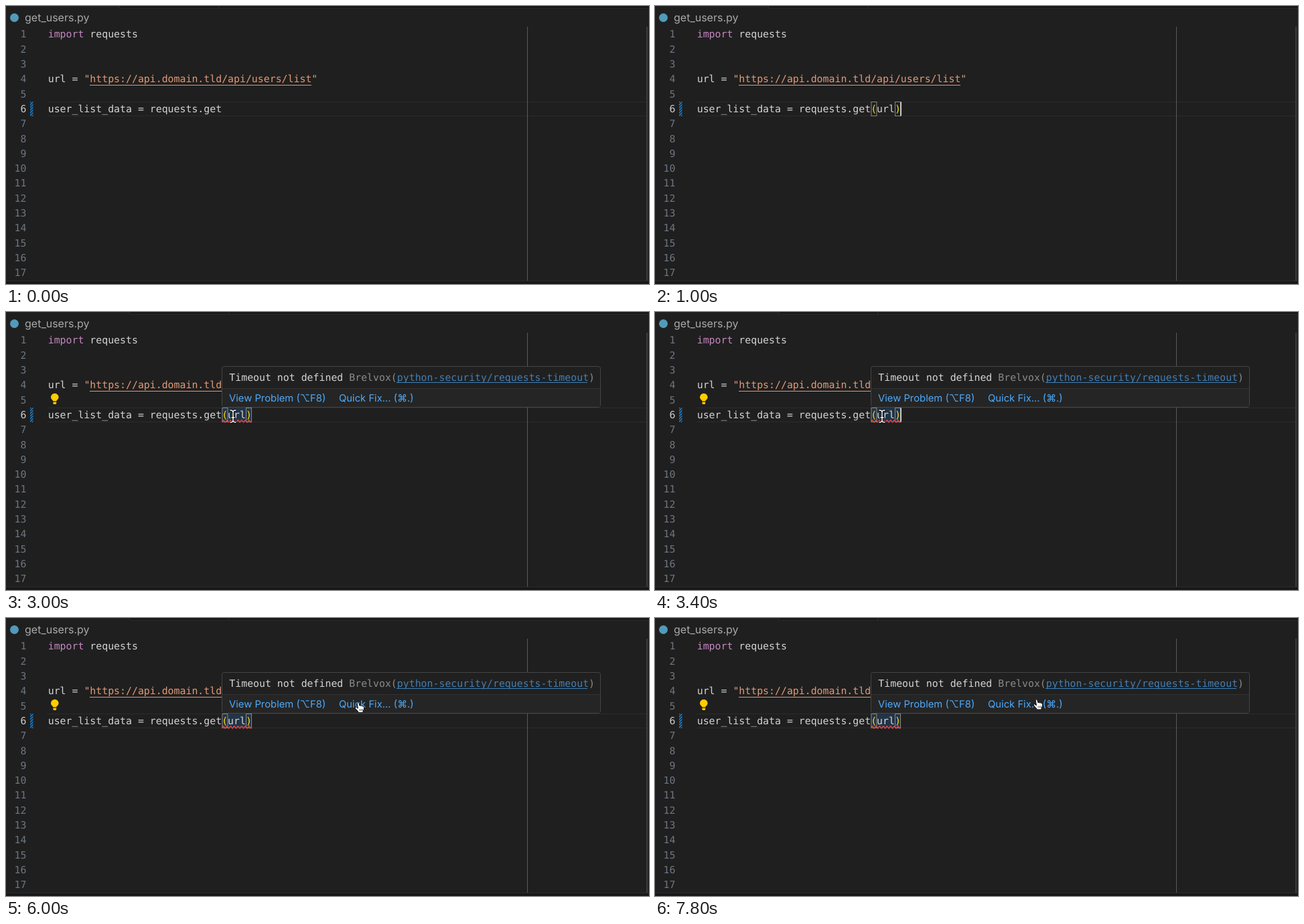
Animation, 960 px wide and 416 px high, one loop 8 s. Source, as an HTML page:

```html
<!DOCTYPE html>
<html lang="en">
<head>
<meta charset="utf-8">
<title>Code editor</title>
<style>
  html, body { margin: 0; width: 100%; height: 100%; overflow: hidden; background: #1f1f1f; }
  svg { display: block; width: 100vw; height: 100vh; }
  text { white-space: pre; text-rendering: geometricPrecision; fill: #d4d4d4; font: 14.86px "DejaVu Sans Mono", monospace; }
  .ui { font: 14.8px Inter, "DejaVu Sans", sans-serif; fill: #4daafc; }
  .crumb { font-size: 16px; fill: #a9a9a9; }
  .kind { font-size: 10.5px; fill: #d4d4d4; }
  .number { text-anchor: end; fill: #6e7681; }
  .active { fill: #cccccc; }
  .keyword { fill: #c586c0; }
  .string { fill: #e09a78; }
  .bracket { fill: #ffd700; }
  .match { fill: #2aaaff; font-weight: bold; }
  .dim { fill: #8b8b8b; }
  .link { fill: #407fb5; }
  .box { fill: #202020; stroke: #454545; }
  .pair rect { fill: none; stroke: #888; }
  .pointer { fill: #fff; stroke: #111; stroke-width: 1; stroke-linejoin: round; }
</style>
</head>
<body>
<svg viewBox="0 0 960 416" preserveAspectRatio="none">
  <defs>
    <pattern id="hatch" width="4" height="4" patternUnits="userSpaceOnUse">
      <path d="M-1 1L1 -1M0 4L4 0M3 5L5 3" stroke="#1687e0" stroke-width="1.5"/>
    </pattern>
  </defs>

  <rect width="960" height="416" fill="#1f1f1f"/>
  <g id="tabs">
    <rect width="960" height="3" fill="#181818"/>
    <path d="M0 3.5H960M.5 0V3M148.5 0V3" stroke="#2b2b2b"/>
  </g>
  <circle cx="12.5" cy="17.5" r="6.5" fill="#519aba"/>
  <text class="ui crumb" x="28" y="23.3">get_users.py</text>

  <path d="M62 143.5H956M62 164.5H956" stroke="#2b2b2b"/>
  <path d="M778.5 31V412" stroke="#5a5a5a"/>
  <path d="M957 31V412" stroke="#484848" stroke-width="1.5"/>
  <rect y="412" width="960" height="4" fill="#181818"/>
  <path d="M0 411.5H960" stroke="#2b2b2b"/>
  <rect x="36" y="143" width="4.5" height="22" fill="url(#hatch)"/>
  <g id="numbers"></g>

  <rect id="range" x="322.5" y="143.5" width="44.5" height="21" fill="#264f78" opacity=".45"/>
  <text x="62.7" y="47.4"><tspan class="keyword">import</tspan> requests</text>
  <text x="62.7" y="114.4">url = <tspan class="string">"https://api.domain.tld/api/users/list"</tspan></text>
  <path d="M125 118.5H456" stroke="#e09a78"/>
  <g id="call" class="pair">
    <rect x="322.9" y="143.5" width="8" height="21"/>
    <rect id="closeBox" y="143.5" width="8" height="21"/>
  </g>
  <text x="62.7" y="158.9">user_list_data = requests.get<tspan id="open" class="bracket"></tspan><tspan id="argument"></tspan><tspan id="close" class="bracket"></tspan></text>
  <path id="squiggle" fill="none" stroke="#f14c4c" stroke-width="1.3"/>
  <rect id="caret" y="143.5" width="2" height="21" fill="#c8c8c8"/>

  <g id="bulb" fill="#ffcc00">
    <path d="M70.4 133.5C70 131.6 67 130.6 67 127.5A5.8 5.8 0 0 1 78.6 127.5C78.6 130.6 75.6 131.6 75.2 133.5Z"/>
    <path d="M70.4 134.8H75.2V136.5A1.5 1.5 0 0 1 73.7 138H71.9A1.5 1.5 0 0 1 70.4 136.5Z"/>
  </g>

  <g id="popup">
    <rect class="box" x="357.5" y="165.5" width="533" height="48" rx="2"/>
    <rect x="358" y="166" width="532" height="22.3" fill="#04395e"/>
    <text class="ui kind" x="361" y="180.5">abc</text>
    <text class="ui kind" x="361" y="202.8">abc</text>
    <text class="match" x="385" y="182">url</text>
    <text x="385" y="204.3"><tspan class="match">u</tspan>se<tspan class="match">r</tspan>_<tspan class="match">l</tspan>ist_data</text>
  </g>

  <g id="hover">
    <rect class="box" x="322.5" y="81.5" width="565" height="61" rx="3"/>
    <rect x="323" y="115" width="564" height="27" rx="2" fill="#252525"/>
    <path d="M323 114.5H887" stroke="#333"/>
    <text x="333.3" y="102.7">Timeout not defined <tspan class="dim">Brelvox(</tspan><tspan class="link">python-security/requests-timeout</tspan><tspan class="dim">)</tspan></text>
    <path d="M583 105.5H868" stroke="#407fb5"/>
    <text class="ui" x="333" y="134.2">View Problem (⌥F8)</text>
    <text class="ui" x="497" y="134.2">Quick Fix... (⌘.)</text>
  </g>

  <g id="beam" fill="none" stroke-linecap="round">
    <path id="beamShape" d="M-4 -9Q0 -9 0 -6Q0 -9 4 -9M0 -6V6M-4 9Q0 9 0 6Q0 9 4 9M-2 2H2" stroke="#111" stroke-width="3.2"/>
    <use href="#beamShape"/>
    <path d="M-4 -9Q0 -9 0 -6Q0 -9 4 -9M0 -6V6M-4 9Q0 9 0 6Q0 9 4 9M-2 2H2" stroke="#fff" stroke-width="1.4"/>
  </g>
  <g id="hand" class="pointer">
    <path d="M-3.8 -6.5Q-2.5 -8.3 -1.2 -6.5L0 -2.6Q1 -4 2.2 -2.5Q3.6 -3.4 4.5 -1.9Q6.3 -2.4 6.6 -.4Q7 3.2 5 5.3V7.5H-2.2V6L-6.4 1.4Q-7.4 -.4 -5.6 -.7L-2.5 1.2Z"/>
    <path d="M.2 2V5M2.3 2V5M4.3 2V5" stroke-width=".7"/>
  </g>
</svg>
<script>
const LOOP = 8000, STEP = 200, LEFT = 62.7, CHAR = 8.946, LINE = 22.3;
const $ = id => document.getElementById(id);
const show = (id, on) => $(id).style.display = on ? "" : "none";
const column = n => LEFT + n * CHAR;
const move = (id, x, y) => $(id).setAttribute("transform", `translate(${x} ${y})`);

for (let n = 1; n <= 17; n++) {
  $("numbers").insertAdjacentHTML("beforeend",
    `<text class="number ${n === 6 ? "active" : ""}" x="30.5" y="${47.4 + (n - 1) * LINE}">${n}</text>`);
}

let wave = "M323 163.5";
for (let x = 323; x < 366; x += 5.5) wave += "q1.4 -3 2.75 0t2.75 0";
$("squiggle").setAttribute("d", wave);

// Mouse stops: [time, x, y], each held until the next one.
const stops = [
  [2400, 372, 200], [2600, 343, 162], [2800, 339, 156],
  [5800, 435, 147], [6000, 528, 134], [6200, 560, 131], [6400, 572, 129.5]
];

function draw(t) {
  const called = t >= 200;
  const argument = t < 400 ? "" : t < 600 ? "ur" : "url";
  const closeColumn = 30 + argument.length;
  $("open").textContent = called ? "(" : "";
  $("argument").textContent = called ? argument : "";
  $("close").textContent = called ? ")" : "";
  show("call", called);
  $("closeBox").setAttribute("x", column(closeColumn) + .6);

  const blinkOn = (t + 8000 * 990 - 2195) % 990 < 640;
  $("caret").setAttribute("x", column(closeColumn + (t >= 1000 ? 1 : 0)) - .8);
  show("caret", called && (t < 1200 || blinkOn));

  show("popup", t >= 600 && t < 1000);
  show("squiggle", t >= 1200);
  show("bulb", t >= 1200);
  move("tabs", 0, 0);
  $("tabs").lastElementChild.setAttribute("transform", `translate(${t >= 1400 ? 184 : 169} 0)`);
  $("tabs").firstElementChild.setAttribute("x", t >= 1400 ? 184 : 169);

  show("hover", t >= 3000);
  show("range", t >= 3000);
  const stop = stops.findLast(([start]) => t >= start);
  show("beam", stop && t < 6000);
  show("hand", t >= 6000);
  if (stop) move(t < 6000 ? "beam" : "hand", stop[1], stop[2]);
}

function tick(now) {
  draw(Math.floor(now % LOOP / STEP) * STEP);
  requestAnimationFrame(tick);
}
draw(0);
requestAnimationFrame(tick);
</script>
</body>
</html>
```
